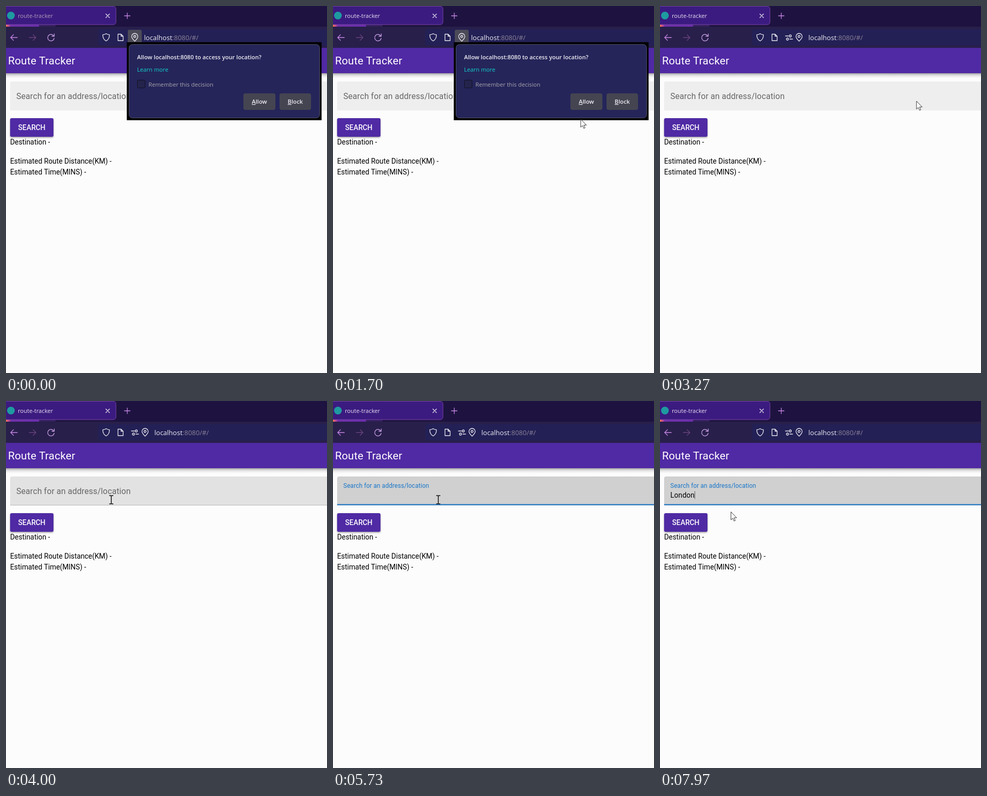
Animation, 622 px wide and 710 px high, one loop 8 s. Source, as an HTML page:

```html
<!DOCTYPE html>
<html lang="en">
<head>
<meta charset="utf-8">
<title>Route Tracker</title>
<style>
  html, body { margin: 0; width: 100%; height: 100%; overflow: hidden; background: #fcfcfd; }
  svg { display: block; width: 622px; height: 710px; }
  text { white-space: pre; }
  .ui { font-family: "Open Sans", "Noto Sans", sans-serif; font-size: 11.2px; }
  .page { font-family: Roboto, sans-serif; font-size: 13.85px; }
  .semi { font-weight: 600; }
  .icon { fill: none; stroke-width: 1.3; stroke-linecap: round; stroke-linejoin: round; }
</style>
</head>
<body>
<svg viewBox="0 0 622 710">
  <defs>
    <linearGradient id="shade" x2="0" y2="1">
      <stop stop-color="#444" stop-opacity=".5"/>
      <stop offset=".45" stop-color="#777" stop-opacity=".2"/>
      <stop offset="1" stop-color="#aaa" stop-opacity="0"/>
    </linearGradient>
    <linearGradient id="accent">
      <stop stop-color="#ff7a45"/>
      <stop offset=".07" stop-color="#d0508c"/>
      <stop offset=".15" stop-color="#7030a8"/>
      <stop offset="1" stop-color="#6a2cae"/>
    </linearGradient>
    <filter id="lift" x="-20%" y="-20%" width="140%" height="160%">
      <feDropShadow dx="0" dy="1.5" stdDeviation="1.6" flood-color="#000" flood-opacity=".4"/>
    </filter>
  </defs>

  <!-- page -->
  <rect width="622" height="710" fill="#fcfcfd"/>
  <rect y="130" width="622" height="10" fill="url(#shade)"/>
  <rect y="81" width="622" height="49" fill="#5029a4"/>
  <g class="page">
    <text x="4" y="113" style="font-size:20.8px;letter-spacing:.2px" fill="#fff">Route Tracker</text>
    <path id="field" d="M8 202V150a4 4 0 0 1 4-4H622V202Z"/>
    <path id="fieldLine" d="M8 201.500H622" stroke="#b8b8b8"/>
    <path id="focusLine" stroke="#1976c8" stroke-width="2"/>
    <text id="label" style="font-size:15.84px;letter-spacing:.148px">Search for an address/location</text>
    <text id="value" x="20" y="187" style="letter-spacing:.13px"></text>
    <path id="caret" stroke="#555"/>
    <rect x="8" y="217" width="84" height="36" rx="3" fill="#5029a4" filter="url(#lift)"/>
    <text x="23.500" y="240" font-weight="500" fill="#fff">SEARCH</text>
    <text x="8" y="268">Destination -</text>
    <text x="8" y="305">Estimated Route Distance(KM) -</text>
    <text x="8" y="326">Estimated Time(MINS) -</text>
  </g>

  <!-- browser -->
  <rect width="622" height="40" fill="#1e1340"/>
  <rect y="40" width="622" height="41" fill="#281f4b"/>
  <rect y="36" width="64" height="4" fill="url(#accent)"/>
  <rect x="64" y="36" width="32" height="4" fill="#34205c"/>
  <path d="M0 .5H208a5 5 0 0 1 5 5V31a5 5 0 0 1-5 5H0Z" fill="#3b1b80"/>
  <path d="M0 .5H208a5 5 0 0 1 5 5V31a5 5 0 0 1-5 5H0" fill="none" stroke="#7a44a8"/>
  <circle cx="9.500" cy="18.500" r="7.500" fill="#1f9aa0"/>
  <text id="tab" class="ui" x="23" y="23">route-tracker</text>
  <path d="M622 45H183a4 4 0 0 0-4 4V72a4 4 0 0 0 4 4H622Z" fill="#232056"/>
  <rect id="pinBox" x="236" y="46" width="27" height="28" rx="3" fill="#4b4a58"/>
  <g class="icon" stroke="#e8e6ee">
    <path d="M193.500 15.500l7 7m0-7l-7 7"/>
    <path stroke="#c585e4" d="M229.500 19h11m-5.500-5.500v11M22 61H9m5.500-5.500L9 61l5.500 5.500"/>
    <path stroke="#68437c" d="M45 61h13m-5.500-5.500L58 61l-5.500 5.500"/>
    <path stroke="#c9a0e4" d="M92.500 58a6.300 6.300 0 1 0 .8 4.500M93.500 54v4.500H89"/>
    <path d="M194 53.500c2 1.500 4 2 6.500 2.200 0 6-2 9.500-6.500 12-4.500-2.500-6.500-6-6.500-12 2.500-.2 4.500-.7 6.500-2.200Z"/>
    <path d="M217 54.500h6l4 4V67h-10Zm6 0v4h4"/>
    <g id="settings">
      <path d="M243 58h6M251.500 64h5.500"/>
      <circle cx="252.500" cy="58" r="2"/>
      <circle cx="247" cy="64" r="2"/>
    </g>
    <g id="pinIcon">
      <path d="M0 7.500C-2.500 5-6 2-6-1.500A6 6 0 0 1 6-1.500C6 2 2.500 5 0 7.500Z"/>
      <circle cy="-1.500" r="2"/>
    </g>
  </g>
  <text id="url" class="ui" y="66" style="font-size:13px" fill="#f0eef4">localhost<tspan fill="#8b8296">:8080/#/</tspan></text>

  <!-- permission prompt -->
  <rect id="promptBack" x="234" y="70" width="377.500" height="151" fill="#000"/>
  <g id="prompt" class="ui" fill="#f0eef4">
    <rect x="238.500" y="74.500" width="369" height="142" rx="6" fill="#25255a" stroke="#50506a"/>
    <text class="semi" x="254" y="103">Allow localhost:8080 to access your location?</text>
    <text x="254" y="127" fill="#12d2cc">Learn more</text>
    <rect x="254.500" y="143.500" width="15" height="15" rx="2" fill="#23234c" stroke="#111122"/>
    <text x="276" y="156" fill="#aaa5ac">Remember this decision</text>
    <rect x="460" y="169" width="62" height="32" rx="4" fill="#454552"/>
    <rect x="530" y="169" width="61" height="32" rx="4" fill="#454552"/>
    <g class="semi" text-anchor="middle">
      <text x="491" y="189"><tspan text-decoration="underline">A</tspan>llow</text>
      <text x="560.500" y="189"><tspan text-decoration="underline">B</tspan>lock</text>
    </g>
  </g>

  <path id="arrow" d="M0 0V15.500L3.600 12.300 6 17.800 8.400 16.700 6 11.400H11Z" fill="#fff" stroke="#222" stroke-width=".9"/>
  <path id="beam" d="M-4-8h3l1 1 1-1h3M-4 8h3l1-1 1 1h3M0-7V7" fill="none" stroke="#111" stroke-width="1.500"/>
</svg>

<script>
const LOOP = 8000;
const el = id => document.getElementById(id);
const clamp = x => Math.min(1, Math.max(0, x));
const mix = (a, b, p) => a + (b - a) * p;
const set = (id, attrs) => { for (const k in attrs) el(id).setAttribute(k, attrs[k]); };
const show = (id, on) => set(id, { visibility: on ? "visible" : "hidden" });

// cubic-bezier(.4, 0, .2, 1), solved by bisection
function standardEase(x) {
  let lo = 0, hi = 1;
  for (let i = 0; i < 24; i++) {
    const u = (lo + hi) / 2, v = 1 - u;
    if (1.2 * v * v * u + 0.6 * v * u * u + u ** 3 < x) lo = u; else hi = u;
  }
  return 3 * (1 - lo) * lo * lo + lo ** 3;
}

// time, x, y of the pointer
const pointerPath = [
  [570, 500, 507], [700, 499, 463], [870, 498, 463], [1030, 493, 427],
  [1400, 486, 367], [1570, 481, 260], [1700, 480, 219], [2030, 484, 216],
  [2430, 497, 184], [3380, 497, 184], [3850, 204, 191],
  [7600, 204, 191], [7930, 137.5, 214.5], [LOOP, 137.5, 214.5]
];
function pointerAt(t) {
  const i = Math.max(1, pointerPath.findIndex(k => k[0] > t));
  const [t0, x0, y0] = pointerPath[i - 1], [t1, x1, y1] = pointerPath[i];
  const p = clamp((t - t0) / (t1 - t0)), s = p * p * (3 - 2 * p);
  return [mix(x0, x1, s), mix(y0, y1, s)];
}

const PROMPT_BLANK = 2570, PROMPT_GONE = 2670, HOVER = 3430, FOCUS = 4765;
const word = "London";
const keyTimes = [6450, 6610, 6760, 7000, 7250, 7470];

function draw(t) {
  const granted = t >= PROMPT_GONE, hover = t >= HOVER, focused = t >= FOCUS;
  set("tab", { fill: t < 100 ? "#b29cb8" : "#e8dff0" });
  show("prompt", t < PROMPT_BLANK);
  show("promptBack", !granted);
  show("pinBox", !granted);
  show("settings", granted);
  set("pinIcon", { transform: `translate(${granted ? 269.5 : 249.5} 60.5)` });
  set("url", { x: granted ? 287.5 : 267.5 });

  const p = standardEase(clamp((t - FOCUS) / 360));
  set("field", { fill: focused ? "#d0d0d0" : hover ? "#e2e2e2" : "#eeeeee" });
  show("fieldLine", hover);
  set("focusLine", { d: `M${mix(600, 8, p)} 200.500H${Math.min(622, mix(600, 1192, p))}` });
  show("focusLine", focused);
  set("label", {
    transform: `translate(20 ${mix(179.5, 167.5, p)}) scale(${mix(1, 0.75, p)})`,
    fill: focused ? "#1976c8" : "#666"
  });

  const typed = keyTimes.filter(k => k <= t).length;
  el("value").textContent = word.slice(0, typed);
  const caretX = Math.floor(20 + (typed ? el("value").getComputedTextLength() : 0)) + 0.5;
  const blinkStart = typed ? keyTimes[typed - 1] : FOCUS;
  set("caret", { d: `M${caretX} 174.500V189.500` });
  show("caret", focused && (t - blinkStart) % 1060 < 530);

  const [x, y] = pointerAt(t), overField = hover && y < 202;
  show("arrow", t >= 570 && !overField);
  show("beam", overField);
  set("arrow", { transform: `translate(${x} ${y})` });
  set("beam", { transform: `translate(${x} ${y})` });
}

const start = performance.now();
function tick() {
  draw((performance.now() - start) % LOOP);
  requestAnimationFrame(tick);
}
tick();
</script>
</body>
</html>
```
